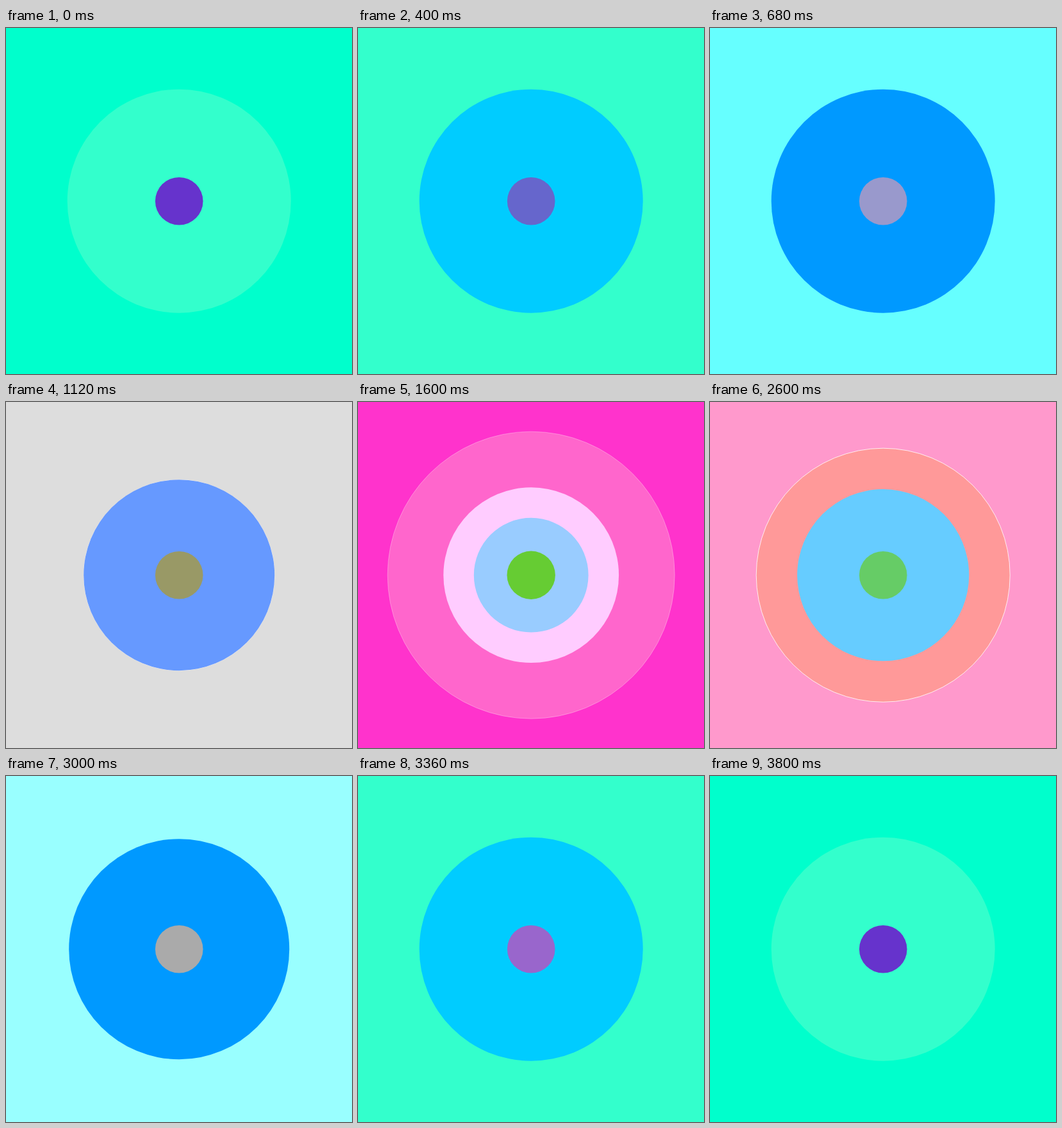
An HTML page for the animation above (3.84 s loop, 540x540 px).

```html
<!DOCTYPE html>
<html lang="en">
<head>
<meta charset="utf-8">
<title>Pulsing rings</title>
<style>
html, body { margin: 0; width: 100%; height: 100%; overflow: hidden; }
svg { display: block; width: 100vw; height: 100vh; }
</style>
</head>
<body>
<svg viewBox="0 0 540 540">
  <rect id="back" width="540" height="540"/>
  <g transform="translate(270.2 270.2)">
    <circle id="outer" stroke="#fff"/>
    <circle id="middle" fill="#fcf"/>
    <circle id="disc"/>
    <circle id="core"/>
  </g>
</svg>
<script>
const STEP = 40, COUNT = 96;
const [back, outer, middle, disc, core] =
  ['back', 'outer', 'middle', 'disc', 'core'].map(id => document.getElementById(id));

// Sine ease from 0 to 1 between steps a and b.
function ramp(x, a, b) {
  const u = Math.min(1, Math.max(0, (x - a) / (b - a)));
  return Math.sin(u * Math.PI / 2) ** 2;
}

const mix = (p, q, u) => p.map((n, i) => n + (q[i] - n) * u);

// Nearest colour of a 6-level cube with a finer grey ramp.
function snap(rgb) {
  const cube = rgb.map(n => Math.round(n / 51) * 51);
  const grey = Math.round((rgb[0] + rgb[1] + rgb[2]) / 51) * 17;
  const flat = [grey, grey, grey];
  const dist = p => p.reduce((sum, n, i) => sum + (n - rgb[i]) ** 2, 0);
  return `rgb(${dist(flat) < dist(cube) ? flat : cube})`;
}

// Two overlapping fades through three colours.
const fade = (a, b, c, first, second) => snap(mix(mix(a, b, first), c, second));

const size = (node, r) => node.setAttribute('r', r);
const fill = (node, colour) => node.setAttribute('fill', colour);

function draw(ms) {
  const n = Math.floor(ms / STEP) % COUNT;
  const x = Math.min(n, COUNT - n); // out and back
  const swap = ramp(x, 18, 48);

  size(outer, 230 * ramp(x, 17, 35.5) - 24 * ramp(x, 36, 48));
  size(middle, 164 * swap);
  size(disc, 174.5 - 102 * swap);
  size(core, 37.3 + 4 * ramp(x, 38, 48));

  fill(back, fade([0, 255, 212], [255, 255, 255], [255, 30, 177], ramp(x, 0, 37), ramp(x, 23, 42)));
  fill(disc, fade([40, 255, 204], [0, 140, 255], [153, 204, 255], ramp(x, 0, 20), ramp(x, 16, 38)));
  fill(core, fade([102, 51, 204], [165, 155, 180], [102, 204, 51], ramp(x, 0, 24), ramp(x, 18, 40)));
  fill(outer, snap(mix([255, 150, 173], [255, 102, 255], ramp(x, 28, 48))));
  outer.setAttribute('stroke-opacity', 0.9 - 0.6 * ramp(x, 28, 40));
}

const start = performance.now();
function tick() {
  draw(performance.now() - start);
  requestAnimationFrame(tick);
}
draw(0);
requestAnimationFrame(tick);
</script>
</body>
</html>
```
